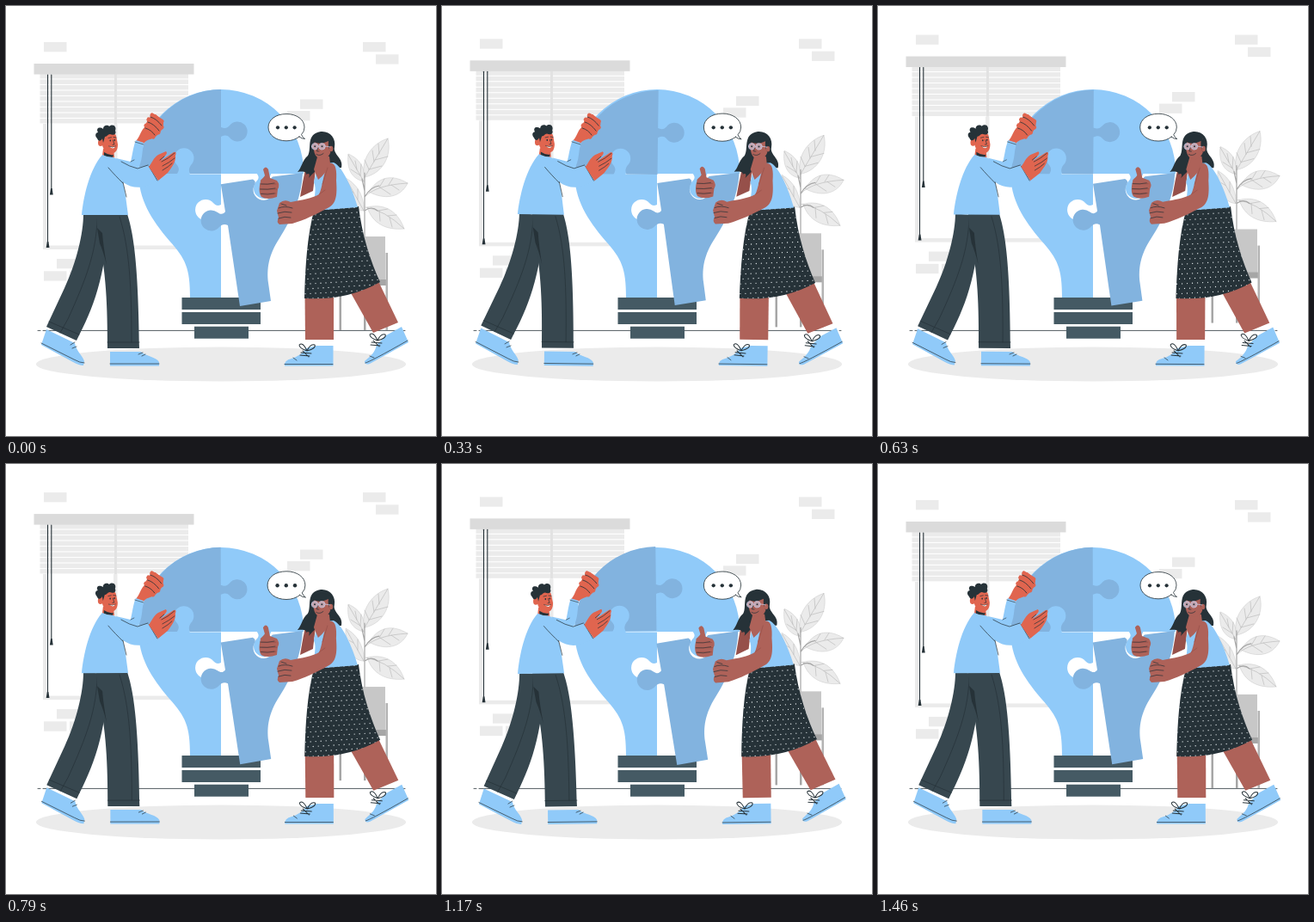
These frames come from a looping animation (500x500 px, 1500 ms). An HTML page with a canvas:

```html
<!DOCTYPE html>
<html lang="en">
<head>
<meta charset="utf-8">
<title>Puzzle bulb</title>
<style>
html, body { margin: 0; width: 100%; height: 100%; overflow: hidden; background: #fff; }
canvas { display: block; width: 100vw; height: 100vh; }
</style>
</head>
<body>
<canvas id="stage" width="500" height="500"></canvas>
<script>
const ctx = document.getElementById('stage').getContext('2d');
const LOOP = 1500;
const TAU = Math.PI * 2;
const INK = '#263238', SLATE = '#37474f', BASE = '#455a64';
const SKY = '#90caf9', STEEL = '#82b3df', PALE = '#ebebeb';
const CORAL = '#e0654f', BROWN = '#ae6259', DEEP = '#96504a';

function fill(color, d) {
  ctx.fillStyle = color;
  ctx.fill(new Path2D(d));
}

function line(color, d, width = 0.8) {
  ctx.strokeStyle = color;
  ctx.lineWidth = width;
  ctx.lineCap = ctx.lineJoin = 'round';
  ctx.stroke(new Path2D(d));
}

function rect(color, x, y, w, h) {
  ctx.fillStyle = color;
  ctx.fillRect(x, y, w, h);
}

function oval(color, x, y, rx, ry = rx, tilt = 0) {
  ctx.fillStyle = color;
  ctx.beginPath();
  ctx.ellipse(x, y, rx, ry, tilt, 0, TAU);
  ctx.fill();
}

function layer(draw, move) {
  ctx.save();
  move();
  draw();
  ctx.restore();
}

function turn(x, y, angle) {
  ctx.translate(x, y);
  ctx.rotate(angle);
  ctx.translate(-x, -y);
}

function drawBricks() {
  const bricks = [[44, 42], [415, 42], [430, 56.3], [342, 108.5], [327, 122],
                  [59, 294], [44, 308.3], [74, 308.3]];
  for (const [x, y] of bricks) rect(PALE, x, y, 26.5, 11.3);
}

function drawWindow() {
  rect(PALE, 43, 79, 169, 204);
  rect('#fff', 47, 79, 161, 199.5);
  rect(PALE, 125, 79, 4.5, 200);
  rect('#fff', 39, 79, 173, 58);
  for (let i = 0; i < 9; i++) rect(PALE, 39.5, 79 + i * 6.5, 172.5, 5.4);
  rect('#e2e2e2', 126, 79, 3, 58);
  rect('#dbdbdb', 32.5, 67, 186, 12.5);
  line(INK, 'M48.5 80V276', 1.1);
  line(INK, 'M52.8 80V215', 1.1);
  fill(INK, 'M47.8 274H49.4L50.5 281H46.7Z');
  fill(INK, 'M52 212H53.6L54.7 219.5H50.9Z');
}

function leaf(d, veins) {
  fill(PALE, d);
  line('#c7c7c7', d, 0.5);
  line('#b5b5b5', veins, 0.6);
}

function drawPlant() {
  leaf('M416 204C402 201 396 190 398 172C412 178 419 190 416 204Z',
    'M416 204L398 173M412 197L413 184M408 190L406 180M412 197L401 190');
  leaf('M417 199C412 183 422 161 444 154C449 174 438 195 417 199Z',
    'M417 199L444 154M422 190L417 179M428 181L426 168M434 172L433 160M422 190L437 186M429 179L444 175');
  leaf('M422 216C432 200 447 194 467 206C459 223 440 226 422 216Z',
    'M417 222Q430 208 467 206M434 211L440 201M445 208L450 200M435 211L447 219M448 208L457 214');
  leaf('M420 234C435 230 454 234 463 259C442 261 426 253 420 234Z',
    'M418 234Q440 237 463 259M433 238L444 236M444 244L454 243M434 238L435 250M446 246L449 257');
  leaf('M416 238C402 238 394 220 395 200C410 208 417 224 416 238Z',
    'M416 238L396 202M409 225L409 213M404 217L399 214');
  line('#a6a6a6', 'M417 268V194M417 222Q424 210 434 209M417 238Q425 232 432 238M417 215L414 201', 1.2);
}

function drawChair() {
  rect('#c7c7c7', 398, 268, 43, 51);
  rect('#a6a6a6', 386, 318, 57, 7);
  rect('#b3b3b3', 441.5, 287, 2.5, 90);
  rect('#a6a6a6', 387.5, 322, 2.5, 55);
  rect('#a6a6a6', 416, 322, 2.5, 55);
}

function drawFloor() {
  oval(PALE, 250, 416.5, 215, 20);
  line(INK, 'M37 377.4H40M43 377.4H459M462 377.4H464', 0.8);
}

function drawBulb() {
  rect(BASE, 204.5, 339, 91.5, 14);
  rect(BASE, 204.5, 356, 91.5, 14);
  rect(BASE, 219, 372.7, 63, 14);
  fill('#fff', 'M250 195H345C340 240 312 270 306 300V339H250Z');
  fill(SKY, 'M250 97A96 96 0 0 1 346 195H250V339H214C214 305 209 294 190 273C169 248 154 225 154 193A96 96 0 0 1 250 97Z');
  fill('#fff', 'M250 231C246 233 244 232 241 229A12 12 0 1 0 241 245C244 242 246 242 250 244Z');
  fill(SKY, 'M291 194C295 199 294 201 291 204A12 12 0 1 0 309 204C306 201 306 199 309 194Z');
  line('#fff', 'M214 195.2H250', 0.7);
}

function drawLeftPiece() {
  fill(STEEL, 'M250 97V141C255 143 257 142 260 139A11.5 11.5 0 1 1 260 153C257 150 255 150 250 152V195H214C212 191 213 188 215 185A11.5 11.5 0 1 0 199 185C202 189 201 192 199 195H155A96 96 0 0 1 250 97Z');
}

function drawRightPiece() {
  fill(STEEL, 'M249.8 207.3L287 201.5C291 204 290 206 288.5 209A12 12 0 1 0 310 208C308 204 306 202 310 198.5L345 194C344 220 334 245 318 270C305 290 303 306 305 322L308 343L272 349L258 255C254 253 251 254 248 257A12 12 0 1 1 246 240C250 243 253 242 255 239Z');
}

function drawManLegs() {
  fill(SLATE, 'M90 242C90 264 82 298 68 328L47 373L82 389C102 350 115 318 120 244Z');
  line(INK, 'M106 248C105 285 94 316 72 364L63 380M50 367L85 382', 0.7);
  fill(SLATE, 'M105 242H141C149 266 154 306 155 398H118C118 350 117 310 106 260Z');
  fill(INK, 'M106 258L112 264Q113 278 117 301Q113 285 109 276Z');
  line(INK, 'M132 245C144 282 146 330 146 391M118 391H155', 0.7);
  fill(SKY, 'M47 376L80 392C82 402 89 406 91 413L90 418Q85 418 78 414L41 394Z');
  line(INK, 'M41 392L79 411Q86 415 91 415M75 394L80 391M77 398L82 396', 0.7);
  fill(SKY, 'M121 402H157C164 408 175 408 178 414V418.5H121Z');
  line(INK, 'M121 416H178M154 405L159 403M158 407L162 405', 0.7);
}

function drawManFarArm() {
  fill(CORAL, 'M151 157C156 152 156 146 161 141C164 133 169 125 174 126L183 134C184 141 180 147 174 152C168 156 163 155 160 160Z');
  line(CORAL, 'M170 127L181 134M166 132L181 141M163 139L177 147M162 146L171 152', 5);
  line(INK, 'M168 129Q175 131 181 139M165 135Q172 137 178 145M162 142Q169 144 173 150', 0.8);
  fill(SKY, 'M128 177L145 181C147 173 148 163 151 156L160 159C158 170 159 180 153 190L137 201Z');
  line(INK, 'M150 158L160 161M145 181L149 179', 0.6);
}

function drawManBody() {
  fill(CORAL, 'M113 166H125L126 176Q118 182 112 174Z');
  fill(INK, 'M114 170Q120 174 125 173L124 176Q117 176 114 174Z');
  fill(SKY, 'M112 173Q118 176 125 176L134 181Q143 187 152 189L167 185L177 203C162 212 149 214 136 205C139 217 140 229 142 243H88C90 222 97 190 112 173Z');
  line(INK, 'M119 188C125 195 130 200 136 206M134 181Q144 187 153 189L165 185M166 186L176 203M136 205L140 222', 0.7);
  // near hand
  fill(CORAL, 'M166 187C170 182 171 177 177 173L186 169Q189 171 183 176L180 180L195 170Q199 169 197 174C198 181 193 187 188 194L177 203Z');
  line(INK, 'M181 181Q188 178 196 171M182 186Q190 182 196 177M182 191Q189 187 193 183M179 179L184 175', 0.7);
}

function drawManHead() {
  fill(CORAL, 'M111 153C110 145 127 145 128 151L130 161C130 168 127 172 122 171C115 171 111 165 111 153Z');
  oval(CORAL, 110, 159, 3, 4);
  fill(INK, 'M113 159L112 154C110 158 107 157 106 154C103 151 104 147 107 147C104 142 109 140 113 143C113 138 119 138 120 140C125 136 129 141 127 145C129 149 125 151 121 149C118 149 118 152 115 152Z');
  oval(INK, 121.3, 156.5, 0.8, 1.1);
  oval(INK, 126.3, 156, 0.8, 1.1);
  line(INK, 'M119 153.5L122.5 152.7M125 152.5L128 153M124.5 156L126 161L124 161.3', 0.7);
  fill('#fff', 'M120 163Q124 165 127 163Q125 168 120 163Z');
  line(INK, 'M119.5 163Q124 165.5 127.5 163', 0.6);
}

function drawWomanFarArm() {
  fill(DEEP, 'M348 190L360 190L357 215L342 222L345 205Z');
  fill(BROWN, 'M296 204C295 202 300 200 301 197L299 190Q302 185 305 190L307 200L315 203Q319 208 316 213L315 222Q304 226 297 222C294 218 294 211 296 204Z');
  line(DEEP, 'M297 207H314M296 213H315M297 218H314', 0.9);
  line(INK, 'M296 207Q304 208 312 206M295.5 213Q304 214 313 212M296.5 218.5Q304 220 312 218', 0.6);
}

function bow(x, y) {
  line(INK, `M${x} ${y}q-9 -3 -9 -7q4 -4 9 7q4 -9 9 -7q2 4 -9 7M${x - 7} ${y + 2}l12 1M${x - 8} ${y + 5}l11 1M${x - 5} ${y}l7 7`, 1);
}

function drawWomanLegs() {
  fill(BROWN, 'M347.5 335H381V388H348Z');
  fill(BROWN, 'M400 332L432 318L456 368L427 380Z');
  fill(SKY, 'M361 395H380.5V418.5H324Q323 412 332 410Q344 406 349 398Z');
  line(INK, 'M324 416.5H380M334 409L338 412', 0.7);
  bow(350, 401);
  fill(SKY, 'M442 383L460 373L468 391L423 416Q417 418 417 413C424 407 429 403 431 394Z');
  line(INK, 'M418 415Q423 414 467 389M423 407L428 409', 0.7);
  bow(432, 389);
}

function drawSkirt() {
  const d = 'M359 235L410 233C414 267 424 297 435 321Q396 343 347 340C348 305 350 265 359 235Z';
  fill(INK, d);
  ctx.save();
  ctx.clip(new Path2D(d));
  for (let row = 0; row < 19; row++) {
    for (let col = 0; col < 17; col++) {
      const x = 345 + col * 6 + (row % 2) * 3;
      oval('#e8eef0', x, 238 + row * 5.7 - (x - 345) * 0.06, 0.65);
    }
  }
  ctx.restore();
}

function drawWomanHead() {
  fill(INK, 'M366 146C377 145 384 154 382 164C380 173 393 177 390 188L370 188C364 186 360 192 352 200C354 195 352 194 349 196C350 193 346 192 339 193C344 188 344 180 351 174C356 166 348 149 366 146Z');
}

function drawWomanBody() {
  fill(SKY, 'M363 184L381 182C391 186 403 213 409 234L358 238C357 225 362 213 358 205Z');
  fill(BROWN, 'M363 172L376 175L377 183Q372 195 363 202L358 190Z');
  fill(BROWN, 'M374 184C383 179 385 190 384 203C385 218 385 230 374 235C361 242 347 249 333 253L318 254Q314 251 317 246L315 238L318 229Q324 224 331 228C346 225 355 224 364 219C368 211 369 195 374 184Z');
  line(INK, 'M317 235Q324 232 333 235M316 241Q324 238 332 240M317 247Q324 244 331 246M320 230L326 232', 0.7);
  line(DEEP, 'M364 219L371 214M374 188L368 207', 0.7);
}

function drawWomanFace() {
  fill(BROWN, 'M359 156Q366 161 377 154L378 169Q374 179 367 178C361 178 357 171 358 163Z');
  fill(INK, 'M357 161C357 149 373 146 380 158L378 171Q374 165 375 157Q365 162 358 158Z');
  oval(BROWN, 378, 166, 2.3, 3.3);
  for (const x of [359.2, 367.5]) {
    oval('#c4a5b0', x, 163.3, 3.5);
    oval(INK, x, 163.3, 1);
  }
  line('#cfd8f5', 'M355.5 163.3a3.7 3.7 0 1 0 7.4 0a3.7 3.7 0 1 0 -7.4 0M363.8 163.3a3.7 3.7 0 1 0 7.4 0a3.7 3.7 0 1 0 -7.4 0M371.2 163L377 164', 0.7);
  line(INK, 'M362.5 165L361.5 169L364 169M361 172.5Q365 175 369 171.5', 0.7);
}

function drawBubble() {
  const d = 'M341 152C337 155 332 156.8 326 156.8C314 156.8 305 150 305 141C305 132 314 125.5 326 125.5C338 125.5 347 132 347 141Q347 146 343.5 149.5Q345 153 347.5 154.5Q344 154.5 341 152Z';
  fill('#fff', d);
  line(INK, d, 0.8);
  for (let i = 0; i < 3; i++) oval(INK, 316 + i * 9.8, 141.3, 2.1);
}

function drawMan() {
  drawLeftPiece();
  drawManLegs();
  drawManFarArm();
  drawManBody();
  drawManHead();
}

function drawWoman() {
  drawRightPiece();
  drawWomanFarArm();
  drawWomanLegs();
  drawSkirt();
  drawWomanHead();
  drawWomanBody();
  drawWomanFace();
}

function drawBackdrop() {
  drawBricks();
  drawWindow();
  drawChair();
  drawPlant();
}

function render(now) {
  const phase = (now % LOOP) / LOOP * TAU;
  const sway = 0.0125 * Math.sin(phase);
  const lift = 4.5 * (Math.cos(phase) - 1);
  const pulse = 1 + 0.05 * ((1 - Math.cos(phase * 3)) / 2) ** 2;

  rect('#fff', 0, 0, 500, 500);
  drawFloor();
  layer(drawBackdrop, () => ctx.translate(0, lift));
  drawBulb();
  layer(drawMan, () => turn(165, 237, sway));
  layer(drawBubble, () => {
    ctx.translate(326, 141);
    ctx.scale(pulse, pulse);
    ctx.translate(-326, -141);
  });
  layer(drawWoman, () => turn(360, 245, sway));
}

const start = performance.now();
function tick() {
  render(performance.now() - start);
  requestAnimationFrame(tick);
}
tick();
</script>
</body>
</html>
```
